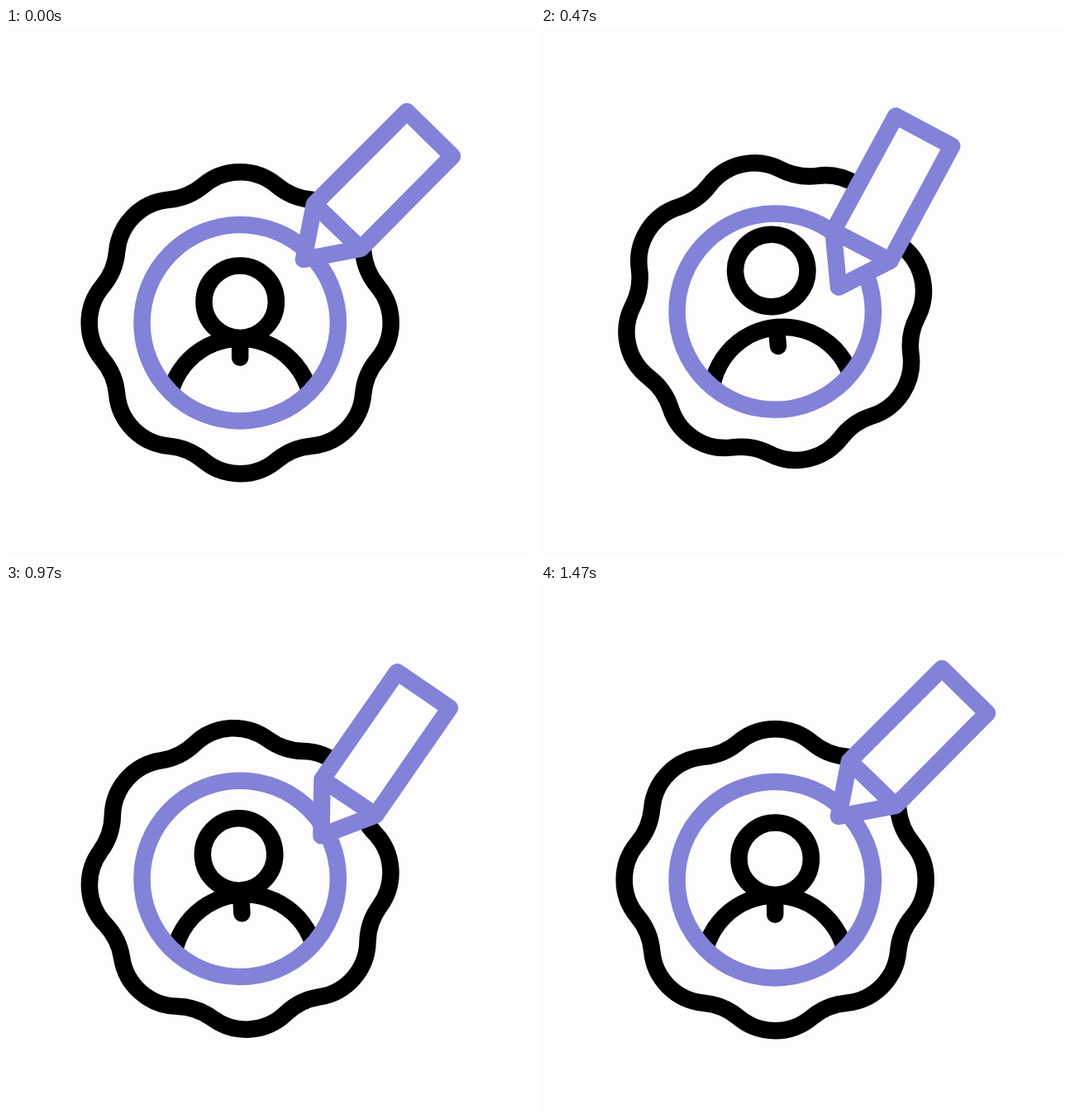
Recreate the animation shown at these times as an HTML page. Size 640x640 px, loop 1.66 s.

```html
<!DOCTYPE html>
<html lang="en">
<head>
<meta charset="utf-8">
<title>Badge and pencil</title>
<style>
  html, body { margin: 0; width: 100%; height: 100%; overflow: hidden; background: #fdfdfd; }
  svg { display: block; width: 100vw; height: 100vh; }
  .line { fill: none; stroke: #000; stroke-width: 20.5; stroke-linecap: round; stroke-linejoin: round; }
  .accent { stroke: #8282d8; }
  .paper { fill: #fdfdfd; }
</style>
</head>
<body>
<svg viewBox="0 0 640 640">
  <clipPath id="inside"><circle r="114"/></clipPath>
  <g id="seal">
    <path id="badge" class="line"/>
    <g clip-path="url(#inside)">
      <g id="person">
        <circle id="head" class="line" cy="-25.5" r="43.7"/>
        <path class="line" d="M-87 106A87 87 0 0 1 87 106M0 19V42"/>
      </g>
    </g>
    <circle class="line accent" r="118.7"/>
  </g>
  <g id="pencil">
    <path class="line accent paper" d="M0 0L13 -67L125 -179L180 -125L69 -13ZM13 -67L69 -13"/>
  </g>
</svg>
<script>
const LOOP = 1660, FRAME = 100 / 3;
const el = id => document.getElementById(id);

// Scalloped outline: eight convex arcs joined by concave ones.
function scallops() {
  const x = 44.35, y = 166.36;
  let d = "";
  for (let i = 0; i < 8; i++) {
    const c = Math.cos(i * Math.PI / 4), s = Math.sin(i * Math.PI / 4);
    const at = px => `${(px * c + y * s).toFixed(2)} ${(px * s - y * c).toFixed(2)}`;
    d += (i ? "A75.4 75.4 0 0 0 " : "M") + at(-x) + "A69 69 0 0 1 " + at(x);
  }
  return d + `A75.4 75.4 0 0 0 ${-x} ${-y}Z`;
}

// Symmetric ease from 0 to 1 between two frames; higher power is steeper.
function ease(f, from, to, power = 1.7) {
  const t = Math.min(1, Math.max(0, (f - from) / (to - from)));
  return t ** power / (t ** power + (1 - t) ** power);
}

// Rises to 1, holds, and falls back to 0.
const pulse = (f, start, top, leave, end) => ease(f, start, top) - ease(f, leave, end);

const place = (id, x, y, turn) =>
  el(id).setAttribute("transform", `translate(${x} ${y}) rotate(${turn})`);

function draw(now) {
  const f = Math.floor((now % LOOP + 4) / FRAME);
  const lift = 15 * pulse(f, 2.5, 17, 17, 32);
  const hop = 30 * pulse(f, 7, 17, 17, 33);
  // Half a turn that overshoots and settles.
  const spin = 5 * ease(f, 33, 44) - 185 * ease(f, 0, 33.1, 2.55);
  const rock = 7 * pulse(f, 12, 20, 20, 26) - 7 * pulse(f, 0, 12, 12, 20)
             - 5 * pulse(f, 20, 26, 26, 33);

  place("seal", 283.2, 356.7 - lift, 0);
  place("badge", 0, 0, spin);
  place("person", 0, 0, rock);
  place("head", 0, -hop, 0);
  place("pencil", 360 + 22 * pulse(f, 16, 28, 28, 37.5),
        280 + 36 * pulse(f, 0, 17, 22, 39), -19 * pulse(f, 5, 17, 22, 36.5));
}

function tick() {
  draw(performance.now());
  requestAnimationFrame(tick);
}

el("badge").setAttribute("d", scallops());
tick();
</script>
</body>
</html>
```
